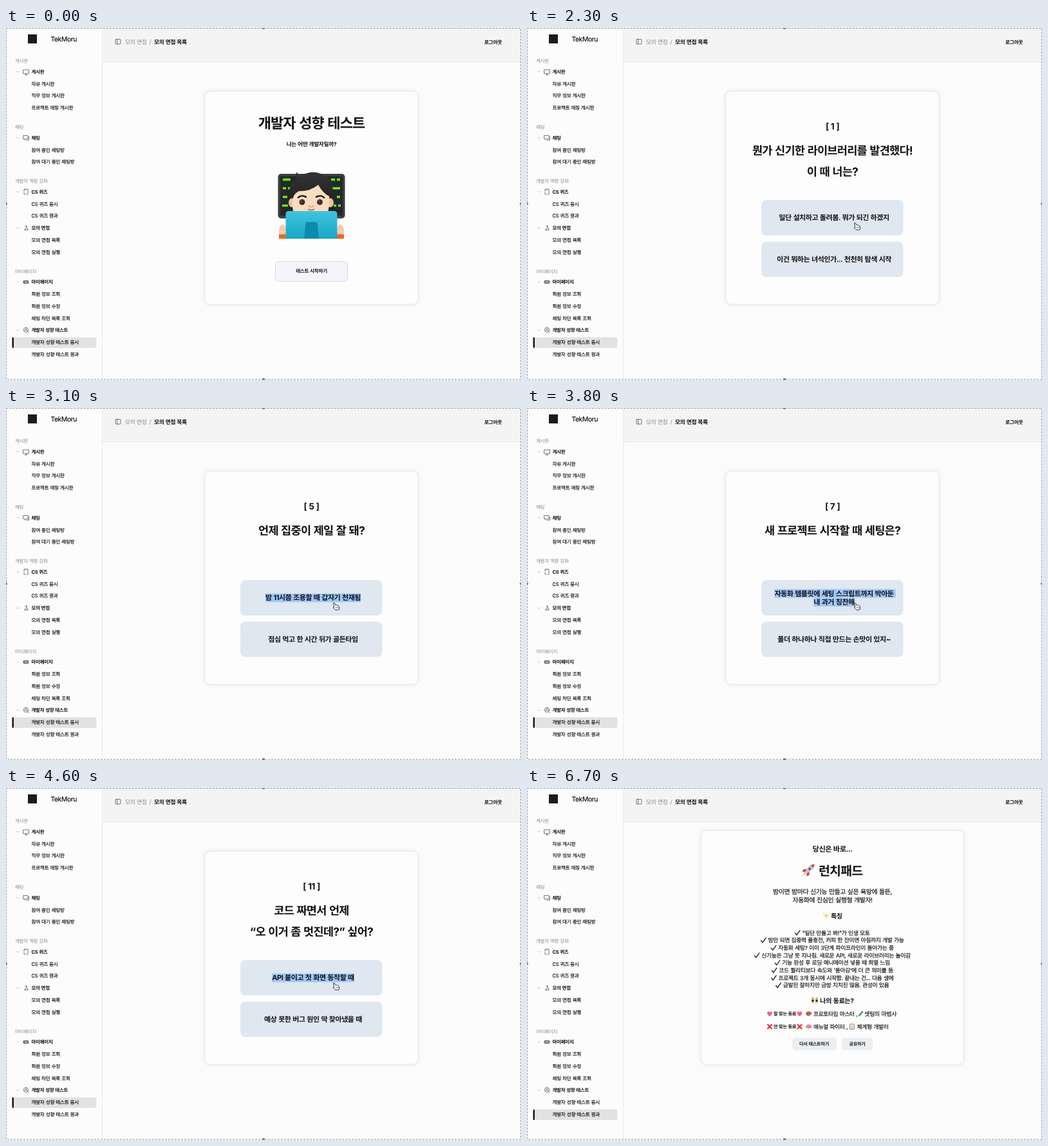
These frames come from a looping animation (800x548 px, 6800 ms). An HTML page:

```html
<!DOCTYPE html>
<html lang="ko">
<head>
<meta charset="utf-8">
<title>개발자 성향 테스트</title>
<style>
  html, body { margin: 0; width: 100%; height: 100%; overflow: hidden; background: #fbfbfb; }
  svg { display: block; width: 800px; height: 548px; }
  text {
    font-family: Inter, "Noto Sans CJK KR", "Noto Sans CJK", sans-serif;
    letter-spacing: -.04em; word-spacing: .05em; text-rendering: geometricPrecision;
    fill: #111; white-space: pre;
  }
  .medium { stroke: #111; stroke-width: .16px; }
  .bold { font-weight: 700; }
  .soft { fill: #8b8b8b; }
  .card { fill: #fdfdfd; stroke: #ececec; filter: drop-shadow(0 0 2.5px rgba(0,0,0,.1)); }
  .line { fill: none; stroke: #555; stroke-width: .8; stroke-linecap: round; stroke-linejoin: round; }
</style>
</head>
<body>
<svg id="stage" viewBox="0 0 800 548">
  <defs>
    <linearGradient id="lid" x2="0" y2="1"><stop stop-color="#40c4de"/><stop offset="1" stop-color="#16a5c4"/></linearGradient>
    <linearGradient id="hair" x2="0" y2="1"><stop stop-color="#343434"/><stop offset="1" stop-color="#1d1d1d"/></linearGradient>
    <clipPath id="crop"><rect x="420" y="220" width="110" height="108"/></clipPath>
    <path id="heart" d="M0 4C-7-1-3-6 0-2.4 3-6 7-1 0 4Z" fill="#ef5da8"/>
    <path id="cross" d="M-3-3 3 3M3-3-3 3" stroke="#e8272c" stroke-width="2.1" stroke-linecap="round"/>
    <g id="hand">
      <ellipse cx="429" cy="314" rx="5" ry="8.5" transform="rotate(12 429 314)" fill="#f7d5b5"/>
      <path d="M427 309l-1 7M430 308v8M433 310v7" stroke="#dfae88" stroke-width=".8" fill="none"/>
      <path d="M424 321q6-3 12 0v8h-12z" fill="#f0651f"/>
      <path d="M425 317q5 3 10 0v5q-5-2-10 0z" fill="#f2c59c"/>
    </g>
  </defs>

  <rect width="800" height="548" fill="#fbfbfb"/>
  <rect width="149" height="548" fill="#fcfcfc"/>
  <rect x="150" width="650" height="52" fill="#f4f4f4"/>
  <path d="M149.5 0V548M150 52.5H800" stroke="#e9e9e9"/>
  <rect x="34" y="10" width="14" height="14" fill="#1b1b1b"/>
  <g class="line" stroke-width="1">
    <rect x="170" y="17.5" width="8" height="7.5" rx="1"/><path d="M172.6 17.5v7.5"/>
  </g>

  <g id="active">
    <rect x="9.5" y="481.5" width="131" height="16.5" rx="3" fill="#e2e2e2"/>
    <rect x="9.500" y="481.500" width="2.500" height="16.500" rx="1.2" fill="#151515"/>
  </g>
  <g id="menu"></g>
  <g class="line">
    <path d="M27 65h8.5v6H27zM31.2 71v1.8M29.5 73h3.5"/>
    <path d="M27 167.500h7v5h-3l-2 2v-2h-2zM35.500 169v5.500h-4"/>
    <path d="M28 254v-3h6v8h-2M28 256v3h2M30 251v1"/>
    <path d="M30 308.500h2.500M31.500 308v4M28.500 314.500h5.500M30 312l-1 2M33 311l.8 3"/>
    <rect x="27" y="393.500" width="8" height="4" rx=".8" fill="#777"/><path d="M28.500 395.500h5" stroke="#eee"/>
    <circle cx="31" cy="470" r="3.600"/><path d="M31 470v-3M31 470l2.500 1.500M33.600 472.800l1.800 1.800M29 470.500h1.500"/>
  </g>

  <g id="intro">
    <rect class="card" x="309" y="98.5" width="331" height="331.5" rx="8"/>
    <g clip-path="url(#crop)">
      <rect x="422.5" y="227" width="104" height="69.5" rx="5" fill="#3b3d40"/>
      <rect x="426" y="231" width="97" height="61" rx="2" fill="#252729"/>
      <path d="M430 236h12M494 236h7M505 236h6M514 236h5M430 249.5h5M438 249.5h5M507 249.5h12M430 263h7M514 263h5M429 276.5h9M507 276.5h6M516 276.5h4" stroke="#66ef18" stroke-width="3.4"/>
      <path d="M440 282q-8-33 13-47-5-5-1-11 1 6 8 5 17-9 34 0 18 8 15 53z" fill="url(#hair)"/>
      <ellipse cx="444" cy="272" rx="5" ry="7" fill="#efc29b"/><ellipse cx="504" cy="272" rx="5" ry="7" fill="#efc29b"/>
      <path d="M445 278q-2-19 10-24 19 0 30-10 7 13 17 18 4 39-28 39-28 0-29-23z" fill="#f9dcc0"/>
      <path d="M454 264q5-5 12-1M482 263q7-4 12 1" stroke="#222" stroke-width="2.6" fill="none" stroke-linecap="round"/>
      <circle cx="460" cy="271" r="4.5" fill="#402e2a"/><circle cx="487.5" cy="271" r="4.5" fill="#402e2a"/>
      <circle cx="458.7" cy="269.5" r="1" fill="#8c736a"/><circle cx="486.2" cy="269.5" r="1" fill="#8c736a"/>
      <path d="M470 277q4 3 8 0" stroke="#dfa47f" stroke-width="2" fill="none" stroke-linecap="round"/>
      <path d="M469 282q5 3 10 0" stroke="#b8585a" stroke-width="1.5" fill="none"/>
      <use href="#hand"/><use href="#hand" transform="matrix(-1 0 0 1 949 0)"/>
      <path d="M434.5 330v-40q0-5 5-5h70q5 0 5 5v40z" fill="url(#lid)"/>
      <path d="M463 330l2-24q.5-4 4-4h11q3.5 0 4 4l2 24z" fill="#0c8aab"/>
    </g>
    <rect x="418.5" y="363.5" width="112" height="31" rx="5" fill="#f4f5fb" stroke="#d9dbe0"/>
  </g>

  <g id="quiz">
    <rect class="card" x="309" y="98.5" width="331" height="331.5" rx="8"/>
    <rect x="364" y="268" width="220.5" height="55" rx="8" fill="#dfe7f1"/>
    <rect x="364" y="332.5" width="220.5" height="55" rx="8" fill="#dfe7f1"/>
    <g id="question"></g>
  </g>

  <g id="result">
    <rect class="card" x="271" y="66.5" width="407" height="364" rx="8"/>
    <g transform="translate(437 128)">
      <path d="M-3-2l-5 1-1 4 5-1zM2 3l-1 5-4 1 1-5z" fill="#cf3340"/>
      <path d="M-5 3l-5 6 6-4z" fill="#f7a428"/>
      <path d="M9.5-9.5Q0-9-5 3l2 2Q9 0 9.5-9.5Z" fill="#b9c3cc"/>
      <path d="M9.5-9.5l-6 1.5 4.500 4.500z" fill="#d93a45"/>
      <circle cx="2" cy="-2" r="2" fill="#35729f"/>
    </g>
    <path d="M465 194.5l1.300 3.300 3.300 1.200-3.300 1.200-1.300 3.300-1.300-3.300-3.300-1.200 3.300-1.200zM461 194l.6 1.200 1.200.6-1.200.6-.6 1.200-.6-1.200-1.200-.6 1.200-.6z" fill="#f7cf62"/>
    <g>
      <circle cx="444" cy="327.5" r="1.9" fill="#e8b44c"/><circle cx="450" cy="327.5" r="1.9" fill="#e8b44c"/>
      <path d="M442 329.5h4l-.5 3.5h-3zM448 329.5h4l-.5 3.5h-3z" fill="#333"/>
      <path d="M443 333v3M445 333v3M449 333v3M451 333v3" stroke="#e3b186"/>
    </g>
    <use href="#heart" x="377" y="351.5"/><use href="#heart" x="423.5" y="351.5"/>
    <use href="#cross" x="377" y="371.5"/><use href="#cross" x="423.5" y="371.5"/>
    <path d="M433 352q1-5 6-4 4 1 3 4-2 0-2 2-4 3-7-2z" fill="#a8663a"/>
    <circle cx="436" cy="351" r=".9" fill="#ef3e3e"/><circle cx="439" cy="350" r=".9" fill="#4aa3f0"/><circle cx="437.5" cy="353.5" r=".8" fill="#f7d038"/>
    <path d="M515.5 355l5-6" stroke="#3a9d4b" stroke-width="2.5"/><path d="M520.5 349l1-1.200" stroke="#245f2e" stroke-width="2"/>
    <path d="M433 372q0-4 4.500-4 5 0 5 4-1 3-4 2l-1 1.500-1.500-1.500q-3 0-3-2z" fill="#ee8fa0"/>
    <path d="M435 371q2-1.500 3 0t3 0" stroke="#c25f76" stroke-width=".7" fill="none"/>
    <rect x="501.5" y="367.5" width="7" height="8" rx=".7" fill="#f5f5f5" stroke="#9a7a55"/>
    <path d="M503 370.5h4M503 372.2h4M503 374h3M503.500 367.500h3" stroke="#888" stroke-width=".6"/>
    <rect x="412" y="388.5" width="69" height="20" rx="5" fill="#eceff2"/>
    <rect x="489" y="388.5" width="48" height="20" rx="5" fill="#eceff2"/>
  </g>

  <g fill="#777">
    <rect x=".5" y=".5" width="799" height="546.5" fill="none" stroke="#999" stroke-dasharray="3 2"/>
    <circle cx="400" r="2"/><circle cx="400" cy="547" r="2"/><circle cy="273.5" r="2"/><circle cx="800" cy="273.5" r="2"/>
  </g>
  <path id="arrow" d="M0 0v10.500l2.400-2.100 1.700 3.900 1.900-.8-1.700-3.800H7.500Z" fill="#111" stroke="#fff" stroke-width=".8"/>
  <g id="pointer">
    <path d="M1 1q1.400-.9 2 .5l1.300 2.900q1-.8 1.800.1 1.100-.5 1.700.4 1.300-.2 1.600.9l.7 3-.6 2.700-5 .5-3.700-3.300q-.6-1.500 1.500-.9z" fill="#fff" stroke="#222" stroke-width=".9" stroke-linejoin="round"/>
    <path d="M5 7.500l.4 2M6.700 7.200l.4 2M8.300 7l.3 2" stroke="#222" stroke-width=".6"/>
  </g>
</svg>

<script>
const LOOP = 6800, STEP = 100, QUIZ_AT = 1900, RESULT_AT = 5300;
const MID = 474.5, ANSWER_MID = 477;
const $ = id => document.getElementById(id);

function add(parent, tag, attrs) {
  const node = document.createElementNS('http://www.w3.org/2000/svg', tag);
  for (const key in attrs) node.setAttribute(key, attrs[key]);
  return parent.appendChild(node);
}

// y is the vertical centre of the line
function label(parent, x, y, size, text, style = 'bold', anchor = 'start') {
  const node = add(parent, 'text', { x, y: y + size * .37, 'font-size': size, class: style, 'text-anchor': anchor });
  node.textContent = text;
  return node;
}
const centred = (parent, y, size, text, style, x = MID) => label(parent, x, y, size, text, style, 'middle');

// --- sidebar and header
const menu = $('menu');
label(menu, 69.5, 17.5, 10.4, 'TekMoru', 'medium');
label(menu, 185, 22, 8.8, '모의 면접', 'soft');
label(menu, 222.5, 22, 9, '/', 'soft');
label(menu, 230, 22, 8.8, '모의 면접 목록');
label(menu, 743, 22, 7.8, '로그아웃');
[[51.5, '게시판'], [154, '채팅'], [238.5, '개발자 역량 강화'], [379, '마이페이지']]
  .forEach(([y, name]) => label(menu, 14, y, 7.5, name, 'soft'));
[
  [68, '게시판', '자유 게시판', '직무 정보 게시판', '프로젝트 매칭 게시판'],
  [171, '채팅', '참여 중인 채팅방', '참여 대기 중인 채팅방'],
  [255, 'CS 퀴즈', 'CS 퀴즈 응시', 'CS 퀴즈 결과'],
  [311.5, '모의 면접', '모의 면접 목록', '모의 면접 실행'],
  [395.5, '마이페이지', '회원 정보 조회', '회원 정보 수정', '채팅 차단 목록 조회'],
  [470.7, '개발자 성향 테스트', '개발자 성향 테스트 응시', '개발자 성향 테스트 결과']
].forEach(([y, name, ...items]) => {
  add(menu, 'path', { d: `M16.5 ${y - 1}l2 2 2-2`, fill: 'none', stroke: '#aaa', 'stroke-width': .8 });
  label(menu, 39.5, y, 7.5, name);
  items.forEach((item, i) => label(menu, 39.5, y + 18.8 * (i + 1), 7.6, item, 'medium'));
});

// --- start screen
centred($('intro'), 147.5, 22, '개발자 성향 테스트');
centred($('intro'), 181, 8.7, '나는 어떤 개발자일까?');
centred($('intro'), 378.5, 7.6, '테스트 시작하기');

// --- result screen
const result = $('result');
centred(result, 94.5, 11.2, '당신은 바로...');
label(result, 453, 128.5, 19.4, '런치패드');
centred(result, 161.5, 9.9, '밤이면 밤마다 신기능 만들고 싶은 욕망에 들뜬,', 'medium');
centred(result, 174.5, 9.9, '자동화에 진심인 실행형 개발자!', 'medium');
label(result, 472, 199, 10, '특징');
[
  '"일단 만들고 봐!"가 인생 모토',
  '밤만 되면 집중력 풀충전, 커피 한 잔이면 아침까지 개발 가능',
  '자동화 세팅? 이미 3단계 파이프라인이 돌아가는 중',
  '신기능은 그냥 못 지나침. 새로운 API, 새로운 라이브러리는 놀이감',
  '기능 완성 후 로딩 애니메이션 넣을 때 희열 느낌',
  "코드 퀄리티보다 속도와 '돌아감'에 더 큰 의미를 둠",
  '프로젝트 3개 동시에 시작함. 끝내는 건... 다음 생에',
  '급발진 잘하지만 금방 지치진 않음. 관성이 있음'
].forEach((trait, i) => {
  const y = 225.3 + 11.7 * i;
  const width = centred(result, y, 8.8, trait, 'medium', MID + 5.5).getComputedTextLength();
  add(result, 'path', {
    d: `M${MID - 5.5 - width / 2} ${y + .5}l2.5 3 5-7`,
    fill: 'none', stroke: '#333', 'stroke-width': 1.5, 'stroke-linecap': 'round'
  });
});
label(result, 455, 331, 10.2, '나의 동료는?');
label(result, 383, 351.5, 7.2, '잘 맞는 동료');
label(result, 445, 351.5, 8.7, '프로토타입 마스터 ,', 'medium');
label(result, 524, 351.5, 9, '셋팅의 마법사', 'medium');
label(result, 383, 371.5, 7.2, '안 맞는 동료');
label(result, 445, 371.5, 8.7, '매뉴얼 파이터 ,', 'medium');
label(result, 512.5, 371.5, 8.8, '체계형 개발러', 'medium');
centred(result, 398, 7.2, '다시 테스트하기', 'bold', 446);
centred(result, 398, 7.1, '공유하기', 'bold', 513);

// --- quiz: [start, selected from, title, first answer, second answer]; "|" breaks a line
const questions = [
  [1900, 2500, '뭔가 신기한 라이브러리를 발견했다!|이 때 너는?', '일단 설치하고 돌려봄. 뭐가 되긴 하겠지', '이건 뭐하는 녀석인가... 천천히 탐색 시작'],
  [2500, 2600, '새 기능을 맡게 됐다!|가장 먼저 하는 일은?', '일단 화면부터 띄워본다', '요구사항부터 꼼꼼히 정리한다'],
  [2700, 2800, '에러가 발생했다!|이 때 너는?', '일단 고쳐보고 다시 돌려봄', '로그부터 차근차근 읽어봄'],
  [2900, 3000, '코드 리뷰할 때 너는?', '잘 돌아가면 바로 승인', '한 줄 한 줄 꼼꼼히 확인'],
  [3000, 3100, '언제 집중이 제일 잘 돼?', '밤 11시쯤 조용할 때 갑자기 천재됨', '점심 먹고 한 시간 뒤가 골든타임'],
  [3200, 3400, '반복되는 작업이 생겼다!', '바로 스크립트로 자동화한다', '익숙한 방법으로 하나씩|직접 처리한다'],
  [3500, 3700, '새 프로젝트 시작할 때 세팅은?', '자동화 템플릿에 세팅 스크립트까지 박아둔|내 과거 칭찬해', '폴더 하나하나 직접 만드는 손맛이 있지~'],
  [3900, 4000, '마감이 얼마 남지 않았다면?', '핵심 기능부터 빠르게 완성', '계획을 다시 세우고|차근차근 진행'],
  [4100, 4200, '팀 회의에서 너는?', '떠오르는 대로 바로 말한다', '충분히 정리하고 말한다'],
  [4300, 4400, '코드에서 더 중요한 것은?', '빠르게 돌아가는 결과', '오래 읽히는 깔끔한 구조'],
  [4500, 4600, '코드 짜면서 언제|“오 이거 좀 멋진데?” 싶어?', 'API 붙이고 첫 화면 동작할 때', '예상 못한 버그 원인 딱 찾아냈을 때'],
  [4700, 4900, '프로젝트가 끝난 뒤 너는?', '바로 다음 프로젝트를 시작한다', '지난 과정을 돌아보고|문서로 정리한다']
];

function drawAnswer(parent, y, answer, selected) {
  const lines = answer.split('|');
  lines.forEach((line, i) => {
    const lineY = y + 13.7 * (i - (lines.length - 1) / 2);
    const text = centred(parent, lineY, 11, line, 'bold', ANSWER_MID);
    if (!selected) return;
    const width = text.getComputedTextLength();
    const tail = i < lines.length - 1 ? 3 : 0;
    const mark = add(parent, 'rect', { x: ANSWER_MID - width / 2, y: lineY - 6.5, width: width + tail, height: 13.4, fill: '#9fc7fa' });
    parent.insertBefore(mark, text);
  });
}

let shown = '';
function drawQuestion(time) {
  const index = questions.findLastIndex(q => q[0] <= time);
  const [, selectAt, title, first, second] = questions[index];
  const selected = time >= selectAt;
  const key = index + '/' + selected;
  if (key === shown) return;
  shown = key;
  const box = $('question');
  box.replaceChildren();
  centred(box, 152.5, 13.6, `[ ${index + 1} ]`);
  title.split('|').forEach((line, i) => centred(box, 190.8 + 33.2 * i, 17.5, line));
  drawAnswer(box, 295.3, first, selected);
  drawAnswer(box, 359.5, second, false);
}

// --- cursor: [time, x, y]
const path = [
  [800, 61, 144], [1200, 604, 385], [1400, 589, 395], [1700, 478, 379], [1900, 478, 377],
  [2100, 484, 344], [2300, 507.5, 302.5], [5300, 507.5, 302.5], [5700, 664, 400]
];
function cursorAt(time) {
  const i = path.findIndex(p => p[0] > time);
  const [t0, x0, y0] = path[i - 1], [t1, x1, y1] = path[i];
  const k = (time - t0) / (t1 - t0);
  return `translate(${x0 + (x1 - x0) * k} ${y0 + (y1 - y0) * k})`;
}

const show = (id, on) => $(id).setAttribute('visibility', on ? 'visible' : 'hidden');

function draw(now) {
  const time = Math.floor(now % LOOP / STEP) * STEP;
  const done = time >= RESULT_AT, quiz = time >= QUIZ_AT && !done;
  show('intro', time < QUIZ_AT);
  show('quiz', quiz);
  show('result', done);
  if (quiz) drawQuestion(time);
  $('active').setAttribute('transform', `translate(0 ${done ? 19 : 0})`);

  const moving = time >= 800 && time < 5700;
  const pointing = time >= 1600 && !done;
  show('arrow', moving && !pointing);
  show('pointer', moving && pointing);
  if (moving) $(pointing ? 'pointer' : 'arrow').setAttribute('transform', cursorAt(time));
}

const start = performance.now();
function tick() {
  draw(performance.now() - start);
  requestAnimationFrame(tick);
}
tick();
</script>
</body>
</html>
```
